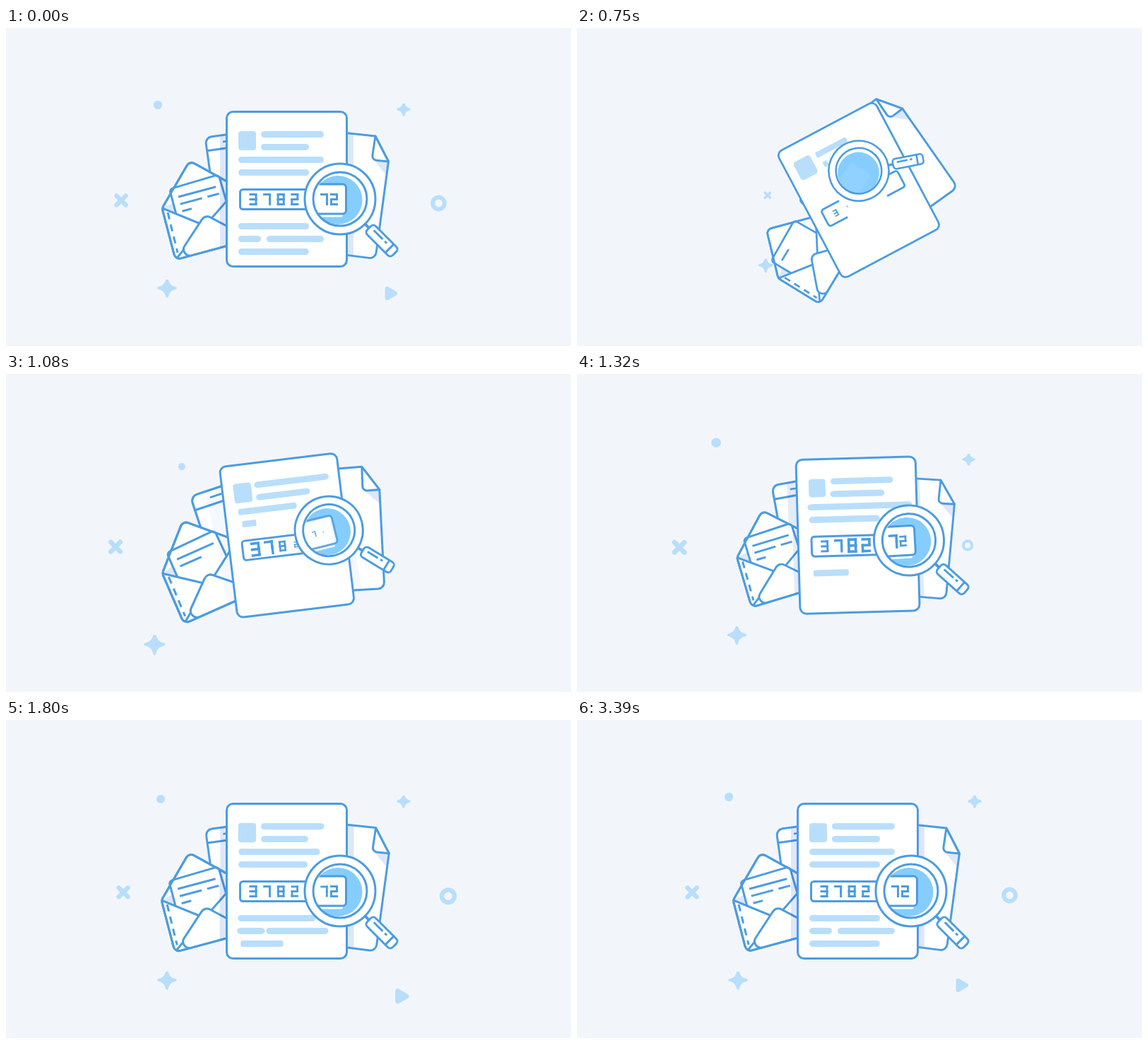
Recreate the animation shown at these times as an HTML page with a canvas. Size 800 by 450 pixels, loop 3.51 s.

```html
<!DOCTYPE html>
<html lang="en">
<head>
<meta charset="utf-8">
<title>Document search</title>
<style>
html, body { margin: 0; width: 100%; height: 100%; overflow: hidden; background: #f2f6fb; }
canvas { display: block; width: 800px; height: 450px; }
</style>
</head>
<body>
<canvas id="stage" width="800" height="450"></canvas>
<script>
const c = document.getElementById('stage').getContext('2d');
const LOOP = 3510, CX = 397.5, CY = 228;
const BG = '#f2f6fb', LINE = '#4c9ce0', PALE = '#b9defb', GLASS = '#86cdff', SHADE = '#dde7fa';

const clamp = v => Math.max(0, Math.min(1, v));

// Linear run up to 1 at `end`, then a damped overshoot carrying the same speed
function spring(t, end, run) {
  const d = t - end;
  if (d < 0) return Math.max(0, 1 + d / run);
  return 1 + 134 / run * Math.exp(-0.00343 * d) * Math.sin(0.00706 * d);
}

function pose(x, y, deg, sx, sy, draw) {
  if (!sx || !sy) return;
  c.save();
  c.translate(x, y);
  c.rotate(deg * Math.PI / 180);
  c.scale(sx, sy);
  c.translate(-x, -y);
  draw();
  c.restore();
}

function poly(pts, r) {
  const n = pts.length, [a, b] = [pts[n - 1], pts[0]];
  c.beginPath();
  c.moveTo((a[0] + b[0]) / 2, (a[1] + b[1]) / 2);
  pts.forEach((p, i) => c.arcTo(...p, ...pts[(i + 1) % n], r));
  c.closePath();
}

function box(x, y, w, h, r) {
  c.beginPath();
  c.roundRect(x, y, w, h, r);
}

function disc(x, y, r) {
  c.beginPath();
  c.arc(x, y, r, 0, Math.PI * 2);
}

function fill(color) {
  c.fillStyle = color;
  c.fill();
}

function stroke(width = 3, color = LINE) {
  c.lineWidth = width;
  c.strokeStyle = color;
  c.stroke();
}

function paint() {
  fill('#fff');
  stroke();
}

function line(x1, y1, x2, y2, width = 3, color = LINE) {
  c.beginPath();
  c.moveTo(x1, y1);
  c.lineTo(x2, y2);
  stroke(width, color);
}

// Small marks around the scene
function star(x, y, r) {
  c.beginPath();
  c.moveTo(x, y - r);
  for (let i = 1; i <= 4; i++) {
    const a = i * Math.PI / 2 - Math.PI / 2, m = a - Math.PI / 4, k = r * 0.22;
    c.quadraticCurveTo(x + k * Math.cos(m), y + k * Math.sin(m), x + r * Math.cos(a), y + r * Math.sin(a));
  }
  fill(PALE);
  stroke(3.5, PALE);
}

function cross(x, y, r) {
  c.lineCap = 'round';
  for (const s of [-r, r]) line(x - s, y - r, x + s, y + r, r, PALE);
}

function arrow(x, y, r) {
  poly([0, 1, 2].map(i => {
    const a = i * Math.PI * 2 / 3;
    return [x + r * Math.cos(a), y + r * Math.sin(a)];
  }), 0.5);
  fill(PALE);
  stroke(5, PALE);
}

const marks = [
  () => star(228, 368, 12),
  () => cross(163, 244, 6.5),
  () => { disc(215, 109, 6.2); fill(PALE); },
  () => star(563, 115, 8),
  () => { disc(612.5, 248, 8.4); stroke(6, PALE); },
  () => arrow(543.5, 375.5, 8.8)
];

function drawMarks(t) {
  marks.forEach((mark, i) => {
    const s = spring(t, 905 + 150 * i, 667);
    pose(CX, CY, 0, s, s, mark);
  });
}

// Soft shadow the main sheet casts on the current path
function castShade(t) {
  c.save();
  c.clip();
  c.globalCompositeOperation = 'multiply';
  c.globalAlpha = clamp((t - 950) / 450);
  c.fillStyle = SHADE;
  c.fillRect(CX - 94.5, CY - 130, 189, 260);
  c.restore();
}

function drawPhone(t) {
  c.save();
  c.translate(282, 155);
  c.rotate(-8 * Math.PI / 180);
  box(0, 0, 80, 125, 9);
  paint();
  line(0, 19, 80, 19);
  line(24, 9.5, 40, 9.5, 2.5);
  box(0, 0, 80, 125, 9);
  c.restore();
  castShade(t);
}

function drawPaper(t) {
  const top = [523, 153], side = [541.5, 189], foot = [408, 312];
  const outline = () => {
    c.beginPath();
    c.moveTo(420, 142);
    c.lineTo(...top);
    c.lineTo(...side);
    c.arcTo(523, 326.5, ...foot, 9);
    c.lineTo(...foot);
    c.closePath();
  };
  outline();
  fill('#fff');
  poly([[521, 187], side, [538, 208]], 0);
  fill(SHADE);
  outline();
  castShade(t);
  stroke();
  c.beginPath();
  c.moveTo(...top);
  c.arcTo(518, 186.5, ...side, 6);
  c.lineTo(...side);
  c.closePath();
  paint();
}

function drawEnvelope(t) {
  const left = [221, 255], right = [329, 226], footL = [240, 328], footR = [348, 299];
  const back = () => poly([left, [260, 188], right, footR, footL], 8);
  back();
  paint();
  poly([left, [237, 247], [242, 264]], 0);
  fill(SHADE);

  poly([[231.5, 228], [301, 207.5], [314, 252], [298, 290], [248, 290]], 5);
  paint();
  pose(244, 239, -15, 1, 1, () => {
    [55, 57, 14].forEach((len, i) => {
      const run = Math.min(len, 0.155 * (t - 620 - 250 * i));
      c.setLineDash(i == 1 ? [32, 8] : []);
      if (run > 0) line(244, 239 + 10.5 * i, 244 + run, 239 + 10.5 * i);
    });
  });
  c.setLineDash([]);

  c.save();
  back();
  c.clip();
  poly([left, [280, 279], footL], 0);
  paint();
  poly([right, [286, 275], footR], 0);
  paint();
  poly([footL, [282, 264], footR], 9);
  paint();
  c.restore();

  c.setLineDash([10, 7.5]);
  line(229, 261, 243, 318);
  c.setLineDash([]);
  back();
  stroke();
  castShade(t);
}

// Segment bits: three bars from the top, right pair, left pair
const digits = { 2: 0b1001111, 3: 0b0011111, 7: 0b0011001, 8: 0b1111111 };

function drawDigit(t, d, x, y, order) {
  const s = spring(t, 870 + 120 * order, 300);
  pose(x, y, 0, s, s, () => {
    c.lineCap = 'square';
    for (let i = 0; i < 7; i++) {
      if (!(digits[d] >> i & 1)) continue;
      const v = i - 3, side = v < 2 ? 4 : -4, top = v % 2 ? 0 : -7;
      if (v < 0) line(x - 4, y - 7 + 7 * i, x + 4, y - 7 + 7 * i);
      else line(x + side, y + top, x + side, y + top + 7);
    }
  });
}

function drawSheet(t) {
  box(312.5, 118.5, 170, 219, 9);
  paint();
  const sq = spring(t, 690, 300);
  pose(341.5, 159.5, 0, sq, sq, () => {
    box(329, 146, 25, 27, 4);
    fill(PALE);
  });

  let order = 0;
  const bar = (x, end, y) => pose(x + 8, y, 0, spring(t, 870 + 150 * order++, 300), 1, () => {
    box(x, y, end - x, 9, 4.5);
    fill(PALE);
  });
  // Text rows: ragged right, a gap after the fourth, one row split in two
  for (let row = 0; row < 7; row++) {
    const low = row > 3, y = 146 + 18 * row + (low ? 58 : 0);
    const end = (row % 2 == 1) == low ? 450 : 429;
    if (row == 5) bar(329, 361, y);
    bar(row < 2 ? 361 : row == 5 ? 369 : 329, end, y);
  }

  const half = 70 * clamp((t - 500) / 500);
  c.save();
  c.beginPath();
  c.rect(328, 220, half, 45);
  c.rect(467 - half, 220, half, 45);
  c.clip();
  box(331.5, 228.5, 132, 28, 4);
  stroke();
  c.restore();
  [3, 7, 8, 2].forEach((d, i) => drawDigit(t, d, 350 + 19.6 * i, 242.5, i));
}

function drawLens(t) {
  const x = 473, y = 242;
  pose(x, y, 45, 1, 1, () => {
    line(x + 50, y, x + 58, y, 4);
    box(x + 58, y - 8.5, 51, 17, 5);
    paint();
    line(x + 99, y - 8, x + 99, y + 8);
    line(x + 65, y - 2.5, x + 83, y - 2.5);
    line(x + 87, y - 2.5, x + 91, y - 2.5);
  });
  disc(x, y, 50);
  paint();
  disc(x, y, 38);
  fill('#fff');
  c.save();
  c.clip();
  disc(x - 3, y + 1.5, 34.5);
  fill(GLASS);
  c.clip();
  c.globalAlpha = clamp((t - 735) / 400);
  box(425, 224, 52, 43.5, 3);
  fill('#fff');
  box(420, 221, 61.5, 42, 5);
  paint();
  drawDigit(t, 7, 450.5, 242.5, 3);
  drawDigit(t, 2, 464.5, 242.5, 4);
  c.restore();
  disc(x, y, 38);
  stroke();
}

function render(now) {
  const raw = now % LOOP;
  const t = raw < 30 ? LOOP : raw;
  c.setTransform(1, 0, 0, 1, 0, 0);
  c.fillStyle = BG;
  c.fillRect(0, 0, 800, 450);
  if (t < 120) return;
  c.lineJoin = 'round';
  c.lineCap = 'butt';

  // Time left, and its quartic ease
  const u = clamp((1870 - t) / 1783), q = u ** 4;
  const size = 1 - 0.5 * q, grow = size * clamp((t - 90) / 150);

  drawMarks(t);
  c.translate(9 * q, 9 * q);
  pose(CX, CY, -180 * q, grow, grow, () => {
    const phone = spring(t, 960, 667);
    const paper = spring(t, 705, 600);
    const env = spring(t, 755, 667);
    pose(CX, CY, -90 * q, phone, phone, () => drawPhone(t));
    c.save();
    c.translate(-125 * q, 0);
    pose(CX, CY, -95 * q, paper, paper, () => drawPaper(t));
    c.restore();
    pose(CX, CY, 0, env, env, () => pose(348, 262, -261 * u ** 6, 1, 1, () => drawEnvelope(t)));
    drawSheet(t);
    const slide = u ** 4.5;
    c.translate(-530 * slide / (1 + slide), -220 * u ** 3.2);
    pose(488.5, 257, -180 * q, size, size, () => drawLens(t));
  });
}

const start = performance.now();
function tick() {
  render(performance.now() - start);
  requestAnimationFrame(tick);
}
tick();
</script>
</body>
</html>
```
